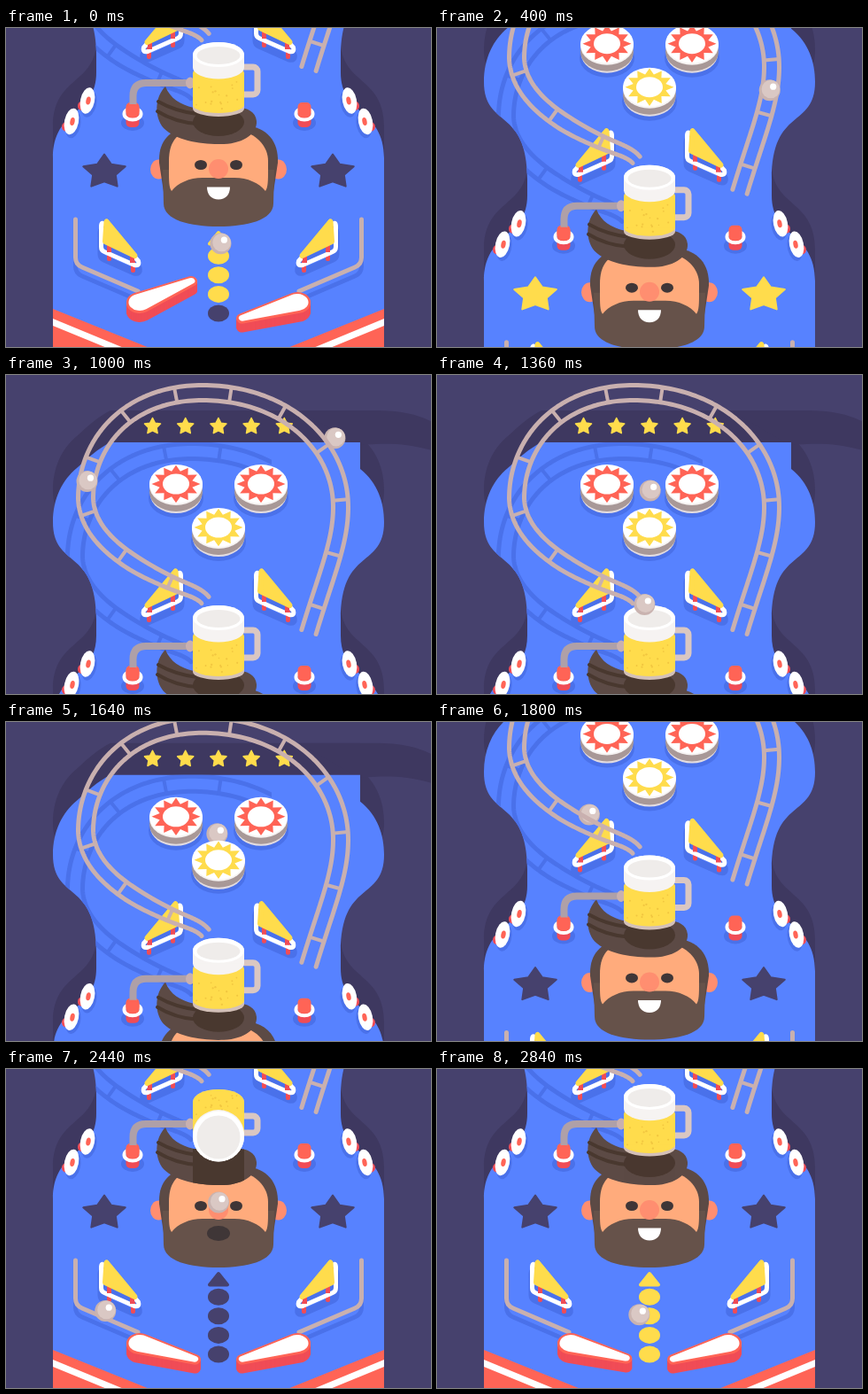
Write an HTML page with a canvas that moves like this. It is 480 px wide and 360 px high and loops after 2.88 s.

```html
<!DOCTYPE html>
<html lang="en">
<head>
<meta charset="utf-8">
<title>Pinball</title>
<style>
html, body { margin: 0; width: 100%; height: 100%; overflow: hidden; background: #46416d; }
canvas { display: block; width: 480px; height: 360px; }
</style>
</head>
<body>
<canvas id="stage"></canvas>
<script>
const LOOP = 2880;
const canvas = document.getElementById('stage');
const ctx = canvas.getContext('2d');
const dpr = window.devicePixelRatio || 1;
canvas.width = 480 * dpr;
canvas.height = 360 * dpr;

const C = {
  night: '#46416d', wall: '#3e3860', blue: '#5782ff', shade: '#4a71ea',
  metal: '#c9b0af', steel: '#afa0a8', handle: '#dac7c2',
  white: '#ffffff', foam: '#f6f3f2', froth: '#efecea',
  red: '#ff6456', darkRed: '#f04c56', yellow: '#ffdc4c', gold: '#f1c640',
  hair: '#5c4a45', darkHair: '#49382f', beard: '#66524a',
  skin: '#ffab7c', blush: '#ff8e70', ink: '#3f3637'
};

const clamp = x => Math.max(0, Math.min(1, x));
const lerp = (a, b, k) => a + (b - a) * k;
const ramp = (t, a, b) => clamp((t - a) / (b - a));
const inOut = (x, n) => x < .5 ? (2 * x) ** n / 2 : 1 - (2 - 2 * x) ** n / 2;
const smooth = x => x * x * (3 - 2 * x);

function fill(path, color) { ctx.fillStyle = color; ctx.fill(path); }
function line(path, color, width) {
  ctx.strokeStyle = color;
  ctx.lineWidth = width;
  ctx.stroke(path);
}
function oval(x, y, rx, ry, color, turn = 0) {
  ctx.beginPath();
  ctx.ellipse(x, y, rx, ry, turn, 0, 7);
  ctx.fillStyle = color;
  ctx.fill();
}
function ring(x, y, rx, ry, color, width) {
  ctx.beginPath();
  ctx.ellipse(x, y, rx, ry, 0, 0, 7);
  ctx.strokeStyle = color;
  ctx.lineWidth = width;
  ctx.stroke();
}
function box(x, y, w, h, r, color) {
  ctx.beginPath();
  ctx.roundRect(x, y, w, h, r);
  ctx.fillStyle = color;
  ctx.fill();
}
function at(x, y, draw) {
  ctx.save();
  ctx.translate(x, y);
  draw();
  ctx.restore();
}
function flipped(draw) {
  ctx.save();
  ctx.translate(480, 0);
  ctx.scale(-1, 1);
  draw();
  ctx.restore();
}
function bothSides(draw) { draw(); flipped(draw); }
function star(count, outer, inner, squash) {
  const path = new Path2D();
  for (let i = 0; i < count * 2; i++) {
    const r = i % 2 ? inner : outer, a = Math.PI * (i / count - .5);
    path.lineTo(r * Math.cos(a), r * Math.sin(a) * squash);
  }
  path.closePath();
  return path;
}

const TABLE = new Path2D('M400-168V-138C420-122 427-100 427-78C427-25 378-50 378 32V50C378 100 427 90 427 147V420H53V147C53 90 102 100 102 50V32C102-50 53-25 53-78C53-105 64-126 80-139C92-150 104-161 118-168Z');
const TUBE = new Path2D('M330-204H415C450-204 465-199 484-190V-158C450-168 430-167 398-165Z');
const GUIDE = new Path2D('M78.500 216V259Q78.500 267 86 270L149 297');
const PIPE = new Path2D('M143.500 90V77Q143.500 62 158 62H206');
const STRIPE_RED = new Path2D('M53 317L162 361H53Z');
const STRIPE_WHITE = new Path2D('M53 328L133 361H114L53 336Z');
const QUIFF = new Path2D('M180 66C168 78 167 100 178 113C192 127 222 132 246 131C270 130 284 118 283 105C282 94 272 90 262 90L212 90C196 86 186 80 180 66Z');
const STRANDS = new Path2D('M172 83C184 90 200 95 216 97M171 94C184 102 200 107 216 108');
const HAIR = new Path2D('M173 152C172 130 182 118 200 112L270 110C295 112 308 128 307 152L302 185H178Z');
const FACE = new Path2D('M184 150C184 130 192 120 205 116H266C285 121 296 135 296 150V192H184Z');
const BEARD = new Path2D('M177 160H184C184 172 184 180 187 184C194 175 207 169 222 169H258C273 169 286 175 293 184C296 180 296 172 296 160H303L302 198C302 217 272 224 240 224C208 224 178 217 178 198Z');
const SMILE = new Path2D('M227 179.500H253C253 188 248 193.500 240 193.500C232 193.500 227 188 227 179.500Z');
const WEDGE = new Path2D('M113.500 218.500L112 241L145.500 257Z');
const FRAME = new Path2D('M107.500 223V247Q107.500 251 111 252.500L145 267.500Q151 269 149.500 263L112 222Q108 218 107.500 223Z');
const ARROW = new Path2D('M240 231L250 243.500H230Z');
const BIG_STAR = star(5, 25, 13.500, .8);
const SMALL_STAR = star(5, 9.500, 4.800, 1);
const BURST = star(12, 27.500, 19, .77);

// Rail: a centre line sampled by arc length.
const curves = [
  [342, 46, 362, -20, 378, -55, 378, -95],
  [378, -95, 378, -165, 315, -224, 222, -224],
  [222, -224, 135, -224, 90, -165, 90, -105],
  [90, -105, 91, -68, 125, -36, 190, -8],
  [190, -8, 207, -1, 218, 2, 225, 10]
];
const rail = [];
let railLength = 0;
for (const c of curves) {
  for (let i = 0; i <= 60; i++) {
    const k = i / 60, m = 1 - k;
    const mix = o => m ** 3 * c[o] + 3 * m * m * k * c[o + 2] + 3 * m * k * k * c[o + 4] + k ** 3 * c[o + 6];
    const p = { x: mix(0), y: mix(1) }, last = rail[rail.length - 1];
    if (last) {
      const step = Math.hypot(p.x - last.x, p.y - last.y);
      if (step < .01) continue;
      railLength += step;
    }
    p.s = railLength;
    rail.push(p);
  }
}
rail.forEach((p, i) => {
  const a = rail[Math.max(0, i - 1)], b = rail[Math.min(rail.length - 1, i + 1)];
  const d = Math.hypot(b.x - a.x, b.y - a.y);
  p.nx = (b.y - a.y) / d;
  p.ny = (a.x - b.x) / d;
  p.half = lerp(8.500, 5.500, ramp(p.s, railLength - 90, railLength));
});
function railAt(s) {
  const i = Math.max(1, rail.findIndex(p => p.s >= s)), a = rail[i - 1], b = rail[i];
  const k = clamp((s - a.s) / (b.s - a.s));
  return { ...b, x: lerp(a.x, b.x, k), y: lerp(a.y, b.y, k) };
}
const TRACKS = new Path2D(), TIES = new Path2D();
for (const side of [-1, 1]) {
  rail.forEach((p, i) => TRACKS[i ? 'lineTo' : 'moveTo'](p.x + p.nx * p.half * side, p.y + p.ny * p.half * side));
}
for (let s = 30; s < railLength; s += 62) {
  const p = railAt(s);
  TIES.moveTo(p.x - p.nx * p.half, p.y - p.ny * p.half);
  TIES.lineTo(p.x + p.nx * p.half, p.y + p.ny * p.half);
}

// One ball's journey takes almost two loops: time, x, y.
const ROUTE = [
  [880, 490, -182], [1000, 372, -173], [1090, 320, -150], [1180, 240, -151],
  [1260, 234, -128], [1330, 246, -118], [1400, 234, -108], [1460, 240, -101],
  [1550, 240, -126], [1640, 239, -102], [1710, 196, -74], [2000, 119, 66],
  [2050, 104, 86], [2180, 94, 150], [2340, 87, 245], [2380, 94, 264],
  [2440, 112, 273], [2800, 214, 312], [2880, 242, 244], [3115, 342, 46]
];
const RAIL_IN = 3115, RAIL_SPEED = .72;
const RAIL_OUT = RAIL_IN + railLength / RAIL_SPEED;

function ballAt(time) {
  if (time < ROUTE[0][0]) return null;
  if (time < RAIL_IN) {
    const i = ROUTE.findIndex(r => r[0] > time), a = ROUTE[i - 1], b = ROUTE[i];
    const k = (time - a[0]) / (b[0] - a[0]);
    return { layer: 'table', x: lerp(a[1], b[1], k), y: lerp(a[2], b[2], k), r: 12 };
  }
  if (time < RAIL_OUT) return { layer: 'rail', ...railAt((time - RAIL_IN) * RAIL_SPEED), r: 12 };
  const hop = (time - RAIL_OUT) / 120;
  if (hop < 1) {
    return { layer: 'top', x: lerp(225, 240, hop), y: lerp(10, 30, hop) - 32 * hop * (1 - hop), r: 12 * clamp((1 - hop) * 4) };
  }
  const t = time - LOOP;
  if (t < 1880 || t > 2500) return null;
  const drop = Math.max(0, t - 2200) / 240;
  return { layer: 'top', x: 240, y: lerp(50, 76, ramp(t, 1880, 1970)) + 74 * drop * drop, r: 12 * ramp(t, 1880, 1940) * ramp(t, 2500, 2470) };
}

function drawBall(b) {
  oval(b.x, b.y, b.r, b.r, '#c9b3b0');
  oval(b.x + b.r * .1, b.y - b.r * .1, b.r * .86, b.r * .86, '#dac8c4');
  oval(b.x + b.r * .33, b.y - b.r * .33, b.r * .3, b.r * .3, C.white);
}

function sling() {
  at(0, 8, () => line(FRAME, C.shade, 8));
  fill(FRAME, C.shade);
  box(141, 262, 5, 14, 2, C.darkRed);
  box(114, 250, 5, 13, 2, C.darkRed);
  line(FRAME, C.white, 5);
  box(114, 243, 5, 10, 0, C.darkRed);
  box(140, 256, 5, 9, 0, C.darkRed);
  fill(WEDGE, C.yellow);
  line(WEDGE, C.yellow, 6);
}

function sideDiscs() {
  for (const [x, y] of [[92, 82], [74, 105.500]]) {
    oval(x + 2, y + 4, 8, 15, C.shade, .25);
    oval(x - 7, y + 6, 4, 5, C.darkRed);
    oval(x, y, 8, 15, C.white, .2);
    oval(x + 1, y, 2.600, 4.500, C.red, .2);
  }
}

function post() {
  oval(143, 107, 13, 9, C.shade);
  box(135.500, 96, 15, 16, 5, C.darkRed);
  ring(143, 97, 9.500, 6.500, C.white, 4);
  box(135.500, 84, 15, 17, 5, C.red);
}

function bumper(x, y, color) {
  at(x, y, () => {
    oval(0, 16, 31, 22, C.shade);
    oval(0, 12, 29, 21, '#e3dce0');
    oval(0, 9, 30, 22, '#a89897');
    oval(0, 2, 30, 22, C.foam);
    oval(0, 0, 30, 22, C.white);
    fill(BURST, color);
    oval(0, 0, 15, 11.500, C.white);
  });
}

// Flippers turn in the table plane, which is seen foreshortened.
function capsule(angle, R, r) {
  const c = Math.cos(angle), s = Math.sin(angle), L = 66;
  const bend = Math.acos((R - r) / L);
  ctx.beginPath();
  ctx.arc(0, 0, R, angle + bend, angle - bend + Math.PI * 2);
  ctx.arc(L * c, L * s, r, angle - bend, angle + bend);
  ctx.closePath();
  ctx.fill();
}
function flipper(angle) {
  const layer = (dy, R, r, color) => at(151, 309.500 + dy, () => {
    ctx.scale(1, .76);
    ctx.fillStyle = color;
    capsule(angle, R, r);
  });
  for (let dy = 11; dy >= 0; dy--) layer(dy, 15, 7, dy < 2 ? C.red : C.darkRed);
  layer(0, 12.500, 4.500, C.white);
}

function head(t, tip) {
  bothSides(() => oval(172.500, 159.500, 9.500, 11, C.blush));
  fill(HAIR, C.hair);
  fill(FACE, C.skin);
  fill(BEARD, C.beard);
  bothSides(() => oval(220, 154.500, 7, 5.500, C.ink));
  oval(240, 159, 11, 11, C.blush);
  fill(QUIFF, C.hair);
  line(STRANDS, C.darkHair, 4);
  ctx.save();
  ctx.clip(QUIFF);
  oval(240, 106, 29, 16, C.darkHair);
  ctx.globalAlpha = tip;
  box(211, 85, 58, 50, 0, C.darkHair);
  ctx.restore();

  const open = ramp(t, 1860, 1960) * ramp(t, 2620, 2520);
  const grin = 1 - ramp(t, 1840, 1900) * ramp(t, 2800, 2660);
  if (open > 0) oval(240, 185.500, 13 * open, 8.500 * open, C.ink);
  if (grin > 0) {
    at(240, 186, () => {
      ctx.scale(grin, grin);
      ctx.translate(-240, -186);
      fill(SMILE, C.white);
    });
  }
}

let seed = 7;
const random = () => (seed = seed * 16807 % 2147483647) / 2147483647;
const bubbles = Array.from({ length: 18 }, () => ({ x: 215 + 50 * random(), k: random(), r: .7 + .5 * random() }));

function mug(tip) {
  const top = lerp(30, 76, tip), topR = lerp(14, 28.500, tip);
  const base = lerp(91, 37, tip), baseR = lerp(9, 14, tip);
  const slice = (a, b, color) => {
    const ya = lerp(top, base, a), yb = lerp(top, base, b);
    oval(240, ya, 29, lerp(topR, baseR, a), color);
    oval(240, yb, 29, lerp(topR, baseR, b), color);
    box(211, Math.min(ya, yb), 58, Math.abs(ya - yb), 0, color);
  };
  const y1 = lerp(44, 53, tip), y2 = lerp(75, 72, tip);
  ctx.beginPath();
  ctx.roundRect(258, y1, 26, y2 - y1, 5);
  ctx.strokeStyle = C.handle;
  ctx.lineWidth = 7;
  ctx.stroke();
  slice(.9, 1, '#d3c0b8');
  slice(lerp(.35, .1, tip), lerp(.93, 1, tip), C.yellow);
  for (const b of bubbles) {
    const curve = Math.sqrt(1 - ((b.x - 240) / 29) ** 2);
    oval(b.x, lerp(52 + b.k * 32 + 10 * curve, 36 - 10 * curve + b.k * 22, tip), b.r, b.r, C.gold);
  }
  slice(0, lerp(.24, .06, tip), C.foam);
  oval(240, top, 29, topR, C.white);
  oval(240, top + 1, 24.500, topR - 4, C.froth);
}

function draw(t) {
  const camera = 244 * (inOut(ramp(t, 0, 774), 4) - inOut(ramp(t, 1297, 2327), 5));
  const tip = smooth(ramp(t, 1820, 1960)) * (1 - smooth(ramp(t, 2680, 2860)));
  const swing = t < 2000 ? 1 - ramp(t, 60, 140) : ramp(t, 2840, 2880);
  const balls = [ballAt(t), ballAt(t + LOOP)].filter(Boolean);
  const show = layer => balls.filter(b => b.layer === layer).forEach(drawBall);
  const since = (t - 2480 + LOOP) % LOOP;

  ctx.setTransform(dpr, 0, 0, dpr, 0, 0);
  ctx.fillStyle = C.night;
  ctx.fillRect(0, 0, 480, 360);
  ctx.translate(0, camera);
  ctx.lineCap = ctx.lineJoin = 'round';

  at(0, -36, () => fill(TABLE, C.wall));
  fill(TUBE, C.wall);
  fill(TABLE, C.blue);
  for (let i = 0; i < 5; i++) {
    at(165.500 + i * 37.200, -186, () => { fill(SMALL_STAR, C.yellow); line(SMALL_STAR, C.yellow, 1.500); });
  }

  ctx.save();
  ctx.clip(TABLE);
  bothSides(() => {
    fill(STRIPE_RED, C.red);
    fill(STRIPE_WHITE, C.white);
    at(0, 10, () => line(GUIDE, C.shade, 5));
  });
  ctx.beginPath();
  ctx.rect(0, -200, 300, 320);
  ctx.clip();
  at(-12, 66, () => { line(TRACKS, C.shade, 5); line(TIES, C.shade, 4); });
  ctx.restore();

  const lit = since < 1500 && Math.floor(since / 120) % 2 === 0;
  const starColor = lit ? C.yellow : C.night;
  for (const x of [111, 369]) {
    at(x, 162.500, () => { fill(BIG_STAR, starColor); line(BIG_STAR, starColor, 2); });
  }
  for (let i = 0; i < 5; i++) {
    const on = since >= 80 + i * 60 && since < 400 + i * 60;
    const color = on ? C.yellow : C.night;
    if (i < 4) oval(240, 322 - i * 21.600, 12, 9.500, color);
    else { fill(ARROW, color); line(ARROW, color, 4); }
  }

  bothSides(() => {
    sideDiscs();
    post();
    sling();
    at(175, -241, sling);
    line(GUIDE, C.metal, 5);
  });
  flipper(lerp(.36, -.5, swing));
  flipped(() => flipper(.36));

  const rolling = balls.find(b => b.layer === 'table');
  const bumpers = [[192, -121, C.red], [288, -121, C.red], [240, -72, C.yellow]];
  bumpers.filter(b => !rolling || b[1] <= rolling.y).forEach(b => bumper(...b));
  if (rolling && rolling.y < 0) drawBall(rolling);
  bumpers.filter(b => rolling && b[1] > rolling.y).forEach(b => bumper(...b));

  line(TIES, C.metal, 4);
  line(TRACKS, C.metal, 5);
  show('rail');

  head(t, tip);
  line(PIPE, C.steel, 8);
  box(135.500, 86, 15, 13, 5, C.red);
  oval(208, 62, 5, 6.500, C.metal);
  mug(tip);
  if (rolling && rolling.y >= 0) drawBall(rolling);
  show('top');
}

function frame(now) {
  draw(now % LOOP);
  requestAnimationFrame(frame);
}
draw(0);
requestAnimationFrame(frame);
</script>
</body>
</html>
```
